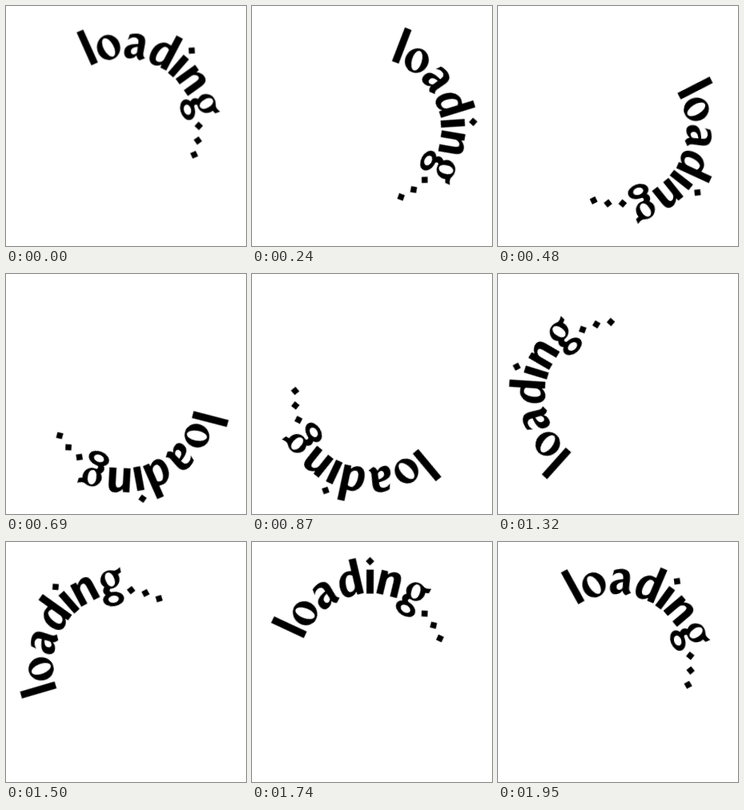
An HTML page that plays this animation: 300x300 px, repeating every 1.98 s.

```html
<!DOCTYPE html>
<html lang="en">
<head>
<meta charset="utf-8">
<title>loading...</title>
<style>
  html, body { margin: 0; width: 100%; height: 100%; overflow: hidden; background: #fff; }
  svg { display: block; width: 100%; height: 100%; }

  /* One hard step every 30 ms, 66 steps per turn, at a slightly uneven speed. */
  .ring { transform-origin: 0 0; animation: turn 1980ms -1ms infinite; }
  @keyframes turn {
    0%       { transform: rotate(0deg);     animation-timing-function: steps(8); }
    12.1212% { transform: rotate(45.2deg);  animation-timing-function: steps(8); }
    24.2424% { transform: rotate(87deg);    animation-timing-function: steps(13); }
    43.9394% { transform: rotate(164.3deg); animation-timing-function: steps(8); }
    56.0606% { transform: rotate(208.8deg); animation-timing-function: steps(13); }
    75.7576% { transform: rotate(277.8deg); animation-timing-function: steps(15); }
    98.4848% { transform: rotate(355.3deg); animation-timing-function: steps(1); }
    100%     { transform: rotate(360deg); }
  }
</style>
</head>
<body>
<svg viewBox="0 0 300 300" role="img" aria-label="loading...">
  <defs>
    <path id="dot" d="M0-5.3 5.3 0 0 5.3-5.3 0z"/>
  </defs>
  <g transform="translate(147.3 153.5)">
    <!-- Each letter stands on a baseline of radius 89, with its top facing outward. -->
    <g class="ring" fill="#000" fill-rule="evenodd">
      <g id="l" transform="rotate(-24.2) translate(0 -89)">
        <path d="M-4.5-45H4.5V0H-4.5z"/>
      </g>
      <g id="o" transform="rotate(-10.6) translate(0 -89)">
        <path d="M14.5-14.5a14.5 15.8 0 1 1-29 0a14.5 15.8 0 1 1 29 0z
                 M5.9-16.4A6.2 12.4-18 1 1-5.9-12.6A6.2 12.4-18 1 1 5.9-16.4z"/>
      </g>
      <g id="a" transform="rotate(8) translate(0 -89)">
        <path d="M-10.5-21.5L-9-29C-4-31 2-31.5 5-30.5C10-29 11.5-25.5 11.5-20L11-8C11-5 12-3.5 14-2L7.5 1.5
                 C5 .5 3.5-1.5 3-4C.5-.5-2.5 1-6 1C-11 1-13-3-13-7.5C-13-14-7-17.5 3-18.5V-20.5
                 C3-24 1-26-2.5-26C-6-26-8.5-24-10.5-21.5z
                 M3-15C-2-14-4.7-12-4.7-8.7C-4.7-6-3.5-4.7-1.5-4.7C.5-4.7 2.5-6 3-8z"/>
      </g>
      <g id="d" transform="rotate(27.6) translate(0 -89)">
        <path d="M4.3-45H13.3V0H5L4.5-4C2-1-1 1-5 1C-11 1-14.3-5-14.3-13.5C-14.3-24-8-31 0-31L4.3-30.5z
                 M4.3-24.5C2-26.5-1-26.5-2.8-25C-5.3-22.5-6.3-18-6.3-13.5C-6.3-8-4.8-5-2-5C1.5-5 4.3-8 4.3-12z"/>
      </g>
      <g id="i" transform="rotate(41) translate(0 -89)">
        <path d="M-4.5-30H4.5V0H-4.5z"/>
        <use href="#dot" y="-40.4"/>
      </g>
      <g id="n" transform="rotate(54.4) translate(0 -89)">
        <path d="M-13.2-30H-5.2L-4.7-26C-1.5-29.5 1.5-31 5-31C10.5-31 13.2-27.5 13.2-21V0H4.5V-19
                 C4.5-23 3.5-24.7 1.2-24.7C-1.5-24.7-4.5-22-4.5-18V0H-13.2z"/>
      </g>
      <g id="g" transform="rotate(73.5) translate(0 -89)">
        <path d="M11-19a12 11.5 0 1 1-24 0a12 11.5 0 1 1 24 0z
                 M4.3-20.3A5.5 8.2-15 1 1-6.3-17.7A5.5 8.2-15 1 1 4.3-20.3z"/>
        <path d="M3-29.5C7-28.5 10-30 13.5-32.5L14-26L8-23z"/>
        <path d="M-9-11C-13-7-12-2-8 0L0-2C-5-4-4-7-1-8z"/>
        <path d="M13 5.8a13.2 9 0 1 1-26.4 0a13.2 9 0 1 1 26.4 0z
                 M6.3 6a6.5 4.5 0 1 1-13 0a6.5 4.5 0 1 1 13 0z"/>
      </g>
      <use href="#dot" transform="rotate(87.8) translate(0 -93.7)"/>
      <use href="#dot" transform="rotate(99) translate(0 -93.7)"/>
      <use href="#dot" transform="rotate(110.2) translate(0 -93.7)"/>
    </g>
  </g>
</svg>
</body>
</html>
```
